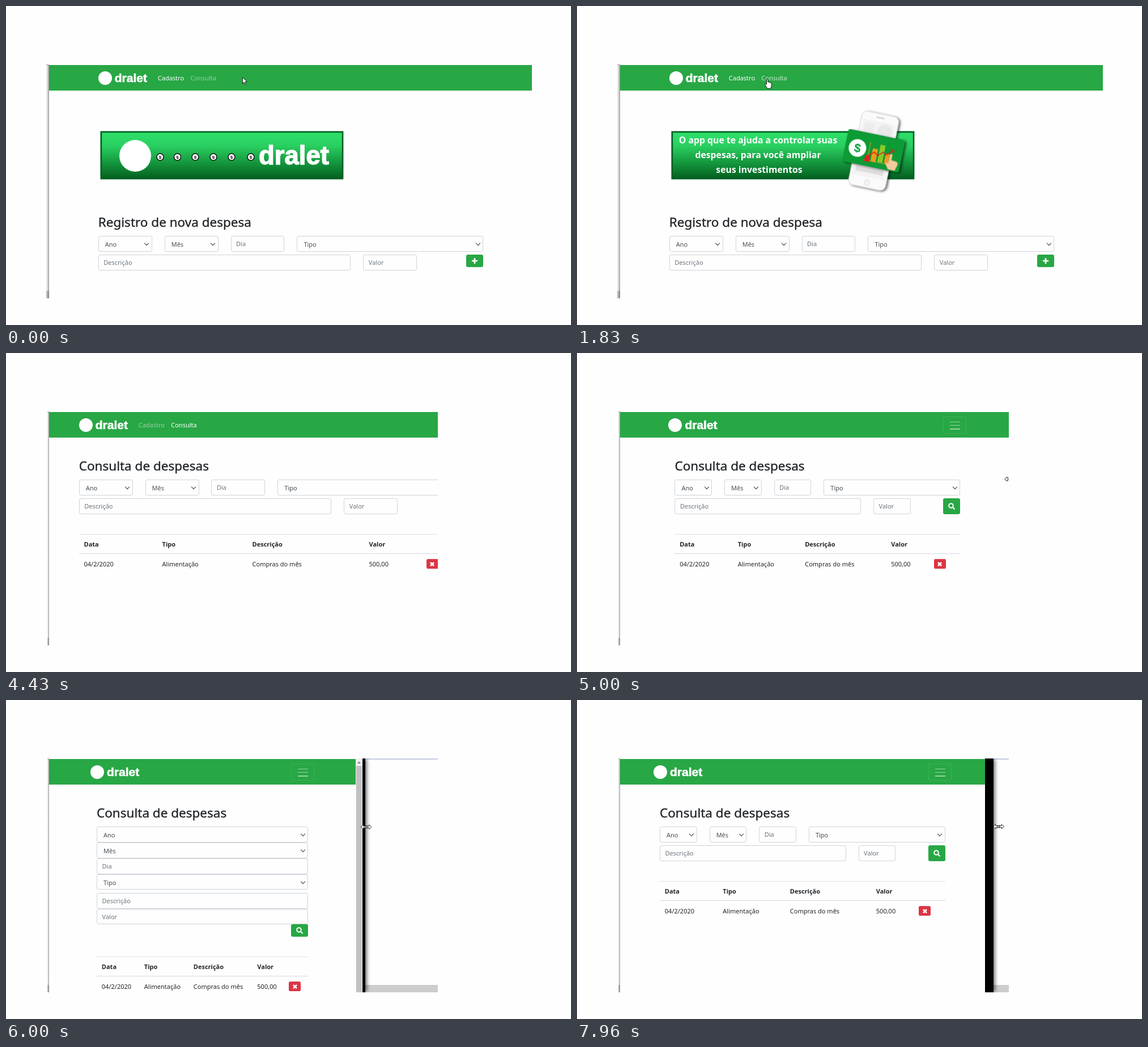
Animation, 997 px wide and 562 px high, one loop 8000 ms. Source, as an HTML page:

```html
<!DOCTYPE html>
<html lang="pt-BR">
<head>
<meta charset="utf-8">
<title>Registro de despesas</title>
<style>
* { box-sizing: border-box; }
html, body { margin: 0; width: 100%; height: 100%; overflow: hidden; background: #fefefe; }
body { position: relative; color: #212529; font: 11px/1.5 "Noto Sans", "Open Sans", sans-serif; }
p, h2 { margin: 0; }

/* every animation shares one 8 s clock */
.anim { animation: 8s linear infinite; }
.cut { animation: 8s step-end infinite; }

#screen { position: absolute; left: 71px; top: 103px; width: 857px; height: 412px; overflow: hidden; animation-name: crop; }
#gutter { position: absolute; left: 0; top: 0; bottom: 0; width: 5px; border-top: 1px solid #999;
  background: linear-gradient(90deg, #f4f4f4, #c4c4c4 75%, #858585); animation-name: gutter; }
#gutter::after { content: ""; position: absolute; left: 0; right: 0; bottom: 0; height: 13px; background: #0003; }
#behind { position: absolute; left: 5px; right: 0; top: 0; bottom: 0; background: #fefefe;
  border-top: 2px solid #c5cde3; border-bottom: 13px solid #cdcdcd; }
#win { position: absolute; left: 5px; top: 0; width: 852px; height: 412px; overflow: hidden;
  background: #000; border-right: 0 solid #000; box-shadow: 4px 0 6px -1px #0008; animation-name: win; }
#view { position: absolute; left: 0; top: 0; width: 853px; height: 412px; background: #fefefe;
  container-type: inline-size; animation-name: view; }

nav { position: absolute; left: 0; right: 0; top: 1px; height: 44.5px; background: #28a745; }
.bar { position: relative; width: 679.4px; height: 100%; margin: 0 auto; line-height: 45px; color: #fff; }
.bar > * { position: absolute; top: 0; }
.bar .mark { left: 0; top: 10.5px; width: 24px; height: 24px; border-radius: 50%; background: #fff; }
.brand { left: 29px; font: bold 21px/46px "Liberation Sans", Arial, sans-serif; -webkit-text-stroke: .6px #fff; }
.add { left: 105px; animation-name: add; }
.find { left: 162.5px; animation-name: find; }
.bar .burger { display: none; right: 0; top: 7.5px; width: 41px; height: 30px; border: 1px solid #ffffff1a; border-radius: 3px; }
.burger i { position: absolute; left: 11px; width: 18px; height: 1.5px; background: #ffffff80; }

.page { position: absolute; inset: 1px 0 0; }
.body { position: relative; width: 679.4px; margin: 0 auto; }
#cadastro { animation-name: early; }
#consulta { animation-name: late; }
#cadastro .body { padding-top: 262.8px; }
#consulta .body { padding-top: 81.2px; }
h2 { height: 28px; margin-bottom: 10px; font-size: 22.5px; line-height: 28px; font-weight: 500; white-space: nowrap; -webkit-text-stroke: .35px; }
.row { --gap: 21.9px; display: flex; gap: var(--gap); height: 27.8px; margin-bottom: 5.5px; }
.row > * { width: calc((100% + var(--gap)) / 12 * var(--n) - var(--gap)); height: 27.8px; }
.c2 { --n: 2; } .c6 { --n: 6; } .c8 { --n: 8; }
.in, .sel { position: relative; border: 1px solid #ced4da; border-radius: 3px; padding-left: 8.5px; line-height: 26.5px; color: #6c757d; }
.sel { padding-left: 11px; line-height: 28px; color: #495057; }
.sel::after { content: ""; position: absolute; right: 5.5px; top: 9px; width: 5px; height: 5px;
  border: solid #343a40; border-width: 0 1.5px 1.5px 0; transform: rotate(45deg); }
.act { text-align: right; }
.btn { display: inline-grid; place-items: center; width: 30px; height: 22px; border-radius: 3px; background: #28a745; vertical-align: top; }
#consulta .btn { height: 27.8px; }
svg { display: block; fill: none; }
.icon { stroke: #fff; stroke-width: 2.6; }

.table { margin-top: 34.5px; border-top: 1px solid #dee2e6; --cols: 138px 159px 206px 101px 1fr; }
.tr { display: grid; grid-template-columns: var(--cols); height: 35px; line-height: 35px; white-space: nowrap; }
.tr > * { padding-left: 8.8px; }
.head { height: 34px; line-height: 34px; font-weight: 700; border-bottom: 1.5px solid #d3d9de; }
.tr .del { display: grid; place-items: center; width: 21px; height: 17.5px; margin: 9px 0 0 8.8px; padding: 0; border-radius: 2.5px; background: #dc3545; }

#scroll { display: none; position: absolute; left: 100%; top: 0; width: 11.5px; height: 100%; background: #f1f1f1; }
#scroll::before { content: ""; position: absolute; left: 3px; top: 5px; border: solid transparent; border-width: 0 3px 4px; border-bottom-color: #888; }
#scroll::after { content: ""; position: absolute; left: 1px; right: 1px; top: 13px; bottom: 0; background: #c1c1c1; }

@container (max-width: 724.9px) {
  .bar { width: 526px; }
  .body { width: 504px; }
  .add, .find { display: none; }
  .bar .burger { display: block; }
  .table { --cols: 102.5px 118.5px 152px 75.5px 1fr; }
}
@container (max-width: 560.9px) {
  .bar { width: 395px; }
  .body { width: 373px; }
  .row { display: block; height: auto; }
  .row > * { width: 100%; }
  .row > .act { height: 22px; }
  #consulta .btn { height: 22px; }
  .table { --cols: 75px 87px 112.5px 56px 1fr; }
  #scroll { display: block; }
}

#banner { position: absolute; left: 0; top: 76px; }
.slide1 { animation-name: fadeout; }
.slide2 { animation-name: fadein; }
.coin { font: bold 8px "Liberation Sans", Arial, sans-serif; text-anchor: middle; }
.slogan { font: 600 15.8px "Noto Sans", "Open Sans", sans-serif; text-anchor: middle; fill: #fff; }

.cursor { position: absolute; left: 0; top: 0; overflow: visible; }
#pointer { animation-name: point; animation-timing-function: ease-in-out; }
#arrow { animation-name: arrow; }
#hand { animation-name: hand; }
#resize { animation-name: resize; }
#handles { animation-name: handles; }

@keyframes crop { 44.5%, 100% { width: 691px; } }
@keyframes gutter { 44.5%, 100% { left: 2px; width: 3px; } }
@keyframes early { 0% { visibility: visible; } 34.5%, 100% { visibility: hidden; } }
@keyframes late { 0% { visibility: hidden; } 34.5%, 100% { visibility: visible; } }
@keyframes add { 0% { color: #fff; } 34.5%, 100% { color: #ffffff80; } }
@keyframes find { 0% { color: #ffffff80; } 12.5% { color: #ffffffbf; } 34.5%, 100% { color: #fff; } }
@keyframes fadeout { 0%, 15% { opacity: 1; } 16.25%, 100% { opacity: 0; } }
@keyframes fadein { 0%, 15% { opacity: 0; } 16.25%, 100% { opacity: 1; } }
@keyframes win {
  0%, 44.49% { width: 852px; }
  44.5% { width: 848px; }
  48.25%, 50% { width: 832px; }
  55.375% { width: 785px; }
  60%, 60.375% { width: 724px; border-right-width: 0; }
  68.25%, 68.7% { width: 605px; border-right-width: 5px; }
  70.4%, 70.75% { width: 594px; border-right-width: 1px; }
  77%, 91.99% { width: 541px; border-right-width: 1px; }
  99.5%, 100% { width: 659px; border-right-width: 1px; }
}
@keyframes view {
  0%, 44.49% { width: 853px; }
  44.5% { width: 848px; }
  48.25%, 50% { width: 832px; }
  55.375% { width: 785px; }
  59.99% { width: 738px; }
  60%, 60.375% { width: 724px; }
  68.25%, 68.7% { width: 624px; }
  70.4%, 70.75% { width: 594px; }
  73.75% { width: 572px; }
  73.76% { width: 549px; }
  77%, 91.99% { width: 528.5px; }
  94.7% { width: 548px; }
  94.71% { width: 574px; }
  99.5%, 100% { width: 644px; }
}
@keyframes point {
  0%, 4.5% { transform: translate(417px, 125px); }
  14.5%, 100% { transform: translate(331px, 128px); }
}
@keyframes arrow { 0% { visibility: visible; } 12.5%, 100% { visibility: hidden; } }
@keyframes hand { 0% { visibility: hidden; } 12.5% { visibility: visible; } 44.5%, 100% { visibility: hidden; } }
@keyframes handles { 0% { visibility: hidden; } 60.375%, 100% { visibility: visible; } }
@keyframes resize {
  0%, 60.375% { transform: translate(727px, 119px); }
  68.25%, 68.7% { transform: translate(602px, 119px); }
  70.4%, 70.75% { transform: translate(597px, 120px); }
  77%, 91.99% { transform: translate(549.5px, 121px); }
  99.5%, 100% { transform: translate(673px, 120px); }
}
</style>
</head>
<body>
<div id="screen" class="cut">
  <div id="behind"></div>
  <div id="gutter" class="cut"></div>
  <div id="win" class="anim">
    <div id="view" class="anim">
      <nav><div class="bar">
        <span class="mark"></span>
        <span class="brand">dralet</span>
        <span class="add cut">Cadastro</span>
        <span class="find cut">Consulta</span>
        <span class="burger"><i style="top:8px"></i><i style="top:14px"></i><i style="top:20.5px"></i></span>
      </div></nav>

      <div id="cadastro" class="page cut"><div class="body">
        <svg id="banner" width="440" height="155" viewBox="163 180 440 155">
          <defs>
            <linearGradient id="green" x2="0" y2="1">
              <stop stop-color="#2ee06b"/><stop offset=".3" stop-color="#29cf60"/>
              <stop offset=".6" stop-color="#18a043"/><stop offset="1" stop-color="#03601f"/>
            </linearGradient>
            <filter id="shade" x="-30%" y="-30%" width="160%" height="160%">
              <feDropShadow dx="3" dy="1" stdDeviation="2" flood-opacity=".6"/>
            </filter>
          </defs>
          <rect x="166" y="220" width="429.5" height="85.5" rx="1" fill="#8cc79e"/>
          <rect x="168" y="222" width="426" height="82" fill="url(#green)" stroke="#075f24" stroke-width="2.5"/>
          <g class="slide1 anim">
            <circle cx="228" cy="264" r="28" fill="#fff"/>
            <g id="coins" class="coin"></g>
            <text x="446" y="279" fill="#fff" stroke="#fff" stroke-width="1.4" font-family="Liberation Sans, Arial, sans-serif" font-weight="700" font-size="45.5">dralet</text>
          </g>
          <g class="slide2 anim">
            <g class="slogan">
              <text x="319.5" y="242">O app que te ajuda a controlar suas</text>
              <text x="319.5" y="268">despesas, para você ampliar</text>
              <text x="321.5" y="294">seus investimentos</text>
            </g>
            <g transform="translate(523.5 255) rotate(11.7)">
              <g filter="url(#shade)">
                <rect x="-33" y="-66" width="66" height="132" rx="9" fill="#fafafa" stroke="#d8d8d8"/>
              </g>
              <rect x="-29" y="-52" width="58" height="100" fill="#f3f3f3"/>
              <circle cx="12" cy="-36" r="13" fill="#e8e8e8"/>
              <rect x="-25" y="-46" width="18" height="16" rx="2" fill="#ececec"/>
              <rect x="-25" y="31" width="50" height="9" rx="3" fill="#ddd"/>
              <path d="M-7 -59H7" stroke="#ccc" stroke-width="2"/>
              <circle cy="57" r="5" fill="#f2f2f2" stroke="#ddd"/>
              <g filter="url(#shade)">
                <rect x="-51" y="-29" width="102" height="58" rx="4" fill="#079b35"/>
              </g>
              <circle cx="-29" cy="1" r="15.5" fill="#fff"/>
              <text x="-29" y="8" font-family="Liberation Sans, Arial, sans-serif" font-weight="700" font-size="21" text-anchor="middle" fill="#079b35">$</text>
              <path d="M-8 -14V19H38" stroke="#d39a20" stroke-width="1.2"/>
              <path d="M-13 10h9v11h-9z" fill="#e02020"/>
              <path d="M-2 -4h9v23h-9z" fill="#f09a1a"/>
              <path d="M10 -13h9v31h-9z" fill="#8ac926"/>
              <path d="M22 1h7v17h-7z" fill="#f09a1a"/>
              <path d="M-12 14L2 2 9 7 17 -1 23 3 35 -8M29 -8h6v6" stroke="#e02020" stroke-width="1.6"/>
              <path d="M30 0q3 -2 4 1v9l9 1q4 1 3 6l-3 10H31l-7 -10q2 -3 5 0z" fill="#f3cb9b" stroke="#c4935c" stroke-width=".6"/>
            </g>
          </g>
        </svg>
        <h2>Registro de nova despesa</h2>
        <div class="row">
          <p class="sel c2">Ano</p><p class="sel c2">Mês</p><p class="in c2">Dia</p><p class="sel c6">Tipo</p>
        </div>
        <div class="row">
          <p class="in c8">Descrição</p><p class="in c2">Valor</p>
          <div class="act c2"><span class="btn"><svg class="icon" width="12" height="12"><path d="M6 1V11M1 6H11"/></svg></span></div>
        </div>
      </div></div>

      <div id="consulta" class="page cut"><div class="body">
        <h2>Consulta de despesas</h2>
        <div class="row">
          <p class="sel c2">Ano</p><p class="sel c2">Mês</p><p class="in c2">Dia</p><p class="sel c6">Tipo</p>
        </div>
        <div class="row">
          <p class="in c8">Descrição</p><p class="in c2">Valor</p>
          <div class="act c2"><span class="btn"><svg class="icon" width="12" height="12" style="stroke-width:2"><circle cx="5" cy="5" r="3.8"/><path d="M7.8 7.8L11.5 11.5"/></svg></span></div>
        </div>
        <div class="table">
          <div class="tr head"><span>Data</span><span>Tipo</span><span>Descrição</span><span>Valor</span></div>
          <div class="tr"><span>04/2/2020</span><span>Alimentação</span><span>Compras do mês</span><span>500,00</span>
            <div class="del"><svg class="icon" width="8" height="8"><path d="M1 1L7 7M7 1L1 7"/></svg></div></div>
        </div>
      </div></div>
      <div id="scroll"></div>
    </div>
  </div>
  <svg id="resize" class="cursor anim" width="1" height="1">
    <g id="handles" class="cut" stroke="#111">
      <path d="M-9.5 0L-5 -4V-1.3H5V-4L9.5 0 5 4V1.3H-5V4Z" fill="#fff" stroke-width=".9"/>
      <path d="M-1.5 -3V3M1.5 -3V3" stroke-width=".8"/>
    </g>
  </svg>
</div>

<svg id="pointer" class="cursor anim" width="1" height="1" stroke="#111">
  <path id="arrow" class="cut" d="M.5 .5V11.5L3 9.2 4.8 13.2 6.6 12.4 4.9 8.5H8.2Z" fill="#fff" stroke-width=".9"/>
  <path id="hand" class="cut" d="M3.5 10V2Q3.5 .6 4.7 .6 5.9 .6 5.9 2V6Q7.6 5.3 8.2 6.6 9.8 6 10.4 7.4 12.4 7 12.4 9V12.5L10.8 17.3H4.8L1 11.3Q.2 9.3 1.7 9Z" fill="#fff"/>
</svg>

<script>
const coins = [272, 302.5, 334, 366, 398, 432];
document.getElementById('coins').innerHTML = coins.map(x =>
  `<circle cx="${x}" cy="266" r="6" fill="#fff" stroke="#111" stroke-width="1.5"/><text x="${x}" y="268.8" fill="#111">$</text>`
).join('');
</script>
</body>
</html>
```
